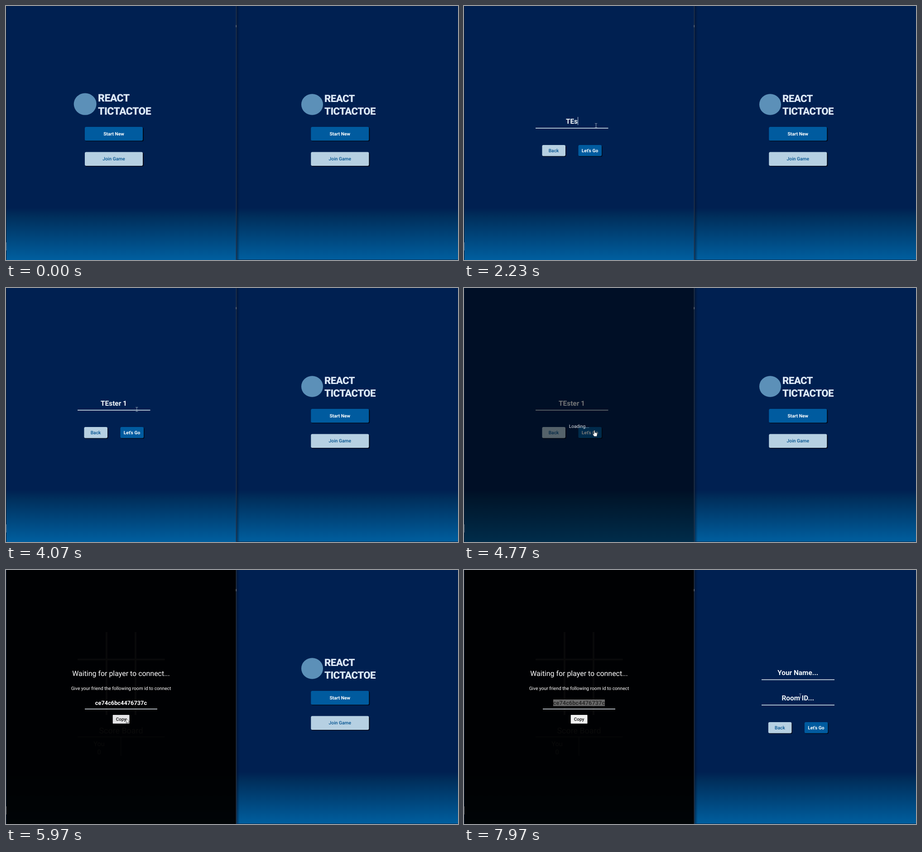
An HTML page that plays this animation: 998 px wide and 561 px high, repeating every 8 s.

```html
<!DOCTYPE html>
<html lang="en">
<head>
<meta charset="utf-8">
<title>Tic-tac-toe rooms</title>
<style>
  html, body { margin: 0; width: 100%; height: 100%; overflow: hidden; background: #00204f; }
  svg { display: block; width: 100%; height: 100%; }
  text { font-family: Roboto, "Open Sans", sans-serif; font-size: 10.26px; fill: #fff; text-anchor: middle; text-rendering: geometricPrecision; }
  .brand { font-weight: 900; text-anchor: start; fill: #dce8f6; letter-spacing: -.6px; }
  .bold { font-weight: 700; }
  .field { font-weight: 700; font-size: 15.4px; fill: #f2f6fa; }
  .room { font-weight: 700; font-size: 12.8px; }
  .dark { fill: #00518f; font-weight: 500; }
  .primary { fill: #005b9f; }
  .light { fill: #b6d0e2; }
  .shadow { fill: #000612; opacity: .85; }
  .rule { fill: #e6eef5; }
  .disc { fill: #5c90b8; }
</style>
</head>
<body>
<svg viewBox="0 0 998 561" preserveAspectRatio="none">
  <defs>
    <linearGradient id="sky" x1="0" y1="0" x2="0" y2="1">
      <stop offset="0" stop-color="#002051"/>
      <stop offset=".795" stop-color="#002051"/>
      <stop offset=".83" stop-color="#002f5c"/>
      <stop offset="1" stop-color="#005f9f"/>
    </linearGradient>
    <linearGradient id="edge">
      <stop offset="0" stop-color="#000c20" stop-opacity=".5"/>
      <stop offset="1" stop-color="#000c20" stop-opacity="0"/>
    </linearGradient>
    <g id="menuButtons">
      <rect class="shadow" x="175" y="268.5" width="129" height="30.5" rx="3"/>
      <rect class="primary" x="174" y="267" width="128" height="30.5" rx="3"/>
      <text class="bold" x="238" y="286">Start New</text>
      <rect class="shadow" x="175" y="324" width="129" height="30.5" rx="3"/>
      <rect class="light" x="174" y="322.5" width="128" height="30.5" rx="3"/>
      <text class="dark" x="238" y="341.2">Join Game</text>
    </g>
    <g id="formButtons">
      <rect class="shadow" x="173.5" y="308.5" width="52" height="24.5" rx="3"/>
      <rect class="light" x="172.5" y="307" width="51.5" height="24.5" rx="3"/>
      <text class="dark" x="198" y="323">Back</text>
      <rect class="shadow" x="253.5" y="308.5" width="52" height="24.5" rx="3"/>
      <rect class="primary" x="252.5" y="307" width="51.5" height="24.5" rx="3"/>
      <text class="bold" x="278" y="323">Let's Go</text>
    </g>
  </defs>

  <rect width="998" height="561" fill="url(#sky)"/>

  <!-- left window -->
  <g data-show="0-640">
    <ellipse class="disc" cx="174.7" cy="216.6" rx="25" ry="24.2"/>
    <text class="brand" x="203" y="210.5" style="font-size:23px">REACT</text>
    <text class="brand" x="203" y="239.5" style="font-size:23px">TICTACTOE</text>
    <use href="#menuButtons"/>
  </g>
  <g data-show="640-4960">
    <text id="name" class="field" x="238" y="259.6"></text>
    <rect id="caret" y="245" width="1" height="18" fill="#c4d2e2"/>
    <rect class="rule" x="158" y="269" width="160.5" height="1.5"/>
    <use href="#formButtons"/>
  </g>
  <g data-show="4700-4960">
    <rect width="508" height="561" opacity=".53"/>
    <text x="254" y="308.5" style="fill:#e4e8ec">Loading...</text>
  </g>
  <g data-show="4960-8000">
    <path d="M222 137V320M286 137V320M158 197.7H350.5M158 259H350.5" stroke="#e9eef6" stroke-width="3.8" fill="none"/>
    <text x="254" y="361" style="font-size:17.9px">Score Board</text>
    <path d="M158 368.7H350.5M253.8 369V410.5" stroke="#dfe7ef" fill="none"/>
    <text x="205.5" y="389" style="font-size:14.6px">You</text>
    <text x="205.5" y="407" style="font-size:14.6px">0</text>
  </g>
  <g data-show="4960-5430">
    <path d="M0 548H168V561H0Z" fill="#020912"/>
    <text x="4" y="557.3" style="font:7.35px 'Open Sans',sans-serif;text-anchor:start">Waiting for react-ttt-app.herokuapp.com...</text>
  </g>
  <g data-show="5430-8000">
    <rect width="508" height="561" opacity=".96"/>
    <text x="254" y="234" style="font-size:15.95px">Waiting for player to connect...</text>
    <text x="254" y="265">Give your friend the following room id to connect</text>
    <rect id="mark" data-show="6400-8000" x="197" y="286" width="114" height="14.5"/>
    <text id="room" class="room" x="254" y="297.7">ce74c6bc4476737c</text>
    <rect class="rule" x="174" y="306.3" width="160" height="1.5"/>
    <rect id="copy" x="235.7" y="320" width="36.8" height="19.3" rx="1"/>
    <text x="254" y="333.2" style="fill:#111;font-weight:500;font-size:10px">Copy</text>
  </g>

  <!-- right window -->
  <g data-show="0-7570">
    <ellipse class="disc" cx="676" cy="217.5" rx="24" ry="23.2"/>
    <text class="brand" x="703" y="211.5" style="font-size:22.2px">REACT</text>
    <text class="brand" x="703" y="239.5" style="font-size:22.2px">TICTACTOE</text>
    <use href="#menuButtons" x="499.3"/>
  </g>
  <g data-show="7570-8000">
    <text class="field" x="737.2" y="232.3">Your Name...</text>
    <rect class="rule" x="657" y="241.6" width="161" height="1.5"/>
    <text class="field" x="737.2" y="288.4">Room ID...</text>
    <rect class="rule" x="657" y="297.6" width="161" height="1.5"/>
    <use href="#formButtons" x="499.4" y="29"/>
  </g>

  <!-- window edges -->
  <rect x="509" width="7" height="561" fill="url(#edge)"/>
  <rect x="507.6" width="1.6" height="561" fill="#26354a"/>
  <rect x="507.5" y="42" width="1.5" height="5" fill="#69727e"/>
  <rect width="1" height="561" fill="#0a1a33"/>
  <rect y="522" width="1" height="18" fill="#69727e"/>
  <rect x="510" y="560" width="488" height="1" fill="#0a2c50"/>

  <g id="cursor">
    <path id="arrow" d="M0 0V10.6L2.5 8.4L4.1 12L5.9 11.2L4.3 7.8H7.6Z" fill="#fff" stroke="#111" stroke-width=".7"/>
    <path id="hand" d="M-1 1Q0 -.6 1 1V5.2L5 6Q6.3 6.4 6.2 8L5.4 13.8H-.6L-3.6 9.4Q-3.9 7.6 -2.4 8L-1 9.2Z" fill="#fff" stroke="#111" stroke-width=".6"/>
    <path id="beam" d="M-2.5 -4.6H-.6L0 -4L.6 -4.6H2.5M0 -4V4M-2.5 4.6H-.6L0 4L.6 4.6H2.5" fill="none" stroke="#aab4c2" stroke-width=".9"/>
  </g>
</svg>
<script>
const LOOP = 8000;
const $ = id => document.getElementById(id);
const timed = [...document.querySelectorAll('[data-show]')].map(el => {
  const [from, to] = el.dataset.show.split('-').map(Number);
  return { el, from, to };
});

const NAME = 'TEster 1';
const keys = [1970, 2090, 2190, 2270, 2340, 2410, 2480, 2540];
const FOCUS = 1070, BLINK = 500;

// time, x, y of the pointer's hot spot
const path = [
  [60, 400, 430], [430, 268, 288], [870, 268, 288], [1070, 285, 258],
  [1400, 291.5, 264], [3830, 291.5, 264], [4070, 288.8, 268], [4500, 288, 314],
  [4820, 288, 314], [5080, 318.5, 256], [5420, 318.5, 256], [5800, 265.5, 328],
  [6600, 265.5, 328], [7180, 822, 340], [7430, 745, 333], [7600, 745, 333], [7850, 742.5, 278]
];
// pointer shape from each time on
const shapes = [
  [60, 'arrow'], [390, 'hand'], [640, 'arrow'], [1000, 'beam'], [4180, 'arrow'],
  [4400, 'hand'], [4960, 'arrow'], [7350, 'hand'], [7570, 'arrow'], [7740, 'beam']
];

const show = (el, on) => { el.style.display = on ? '' : 'none'; };

function pointerAt(t) {
  const i = path.findIndex(p => p[0] > t);
  if (i === 0) return path[0].slice(1);
  if (i < 0) return path[path.length - 1].slice(1);
  const [t0, x0, y0] = path[i - 1], [t1, x1, y1] = path[i];
  const u = (t - t0) / (t1 - t0), e = u * u * (3 - 2 * u);
  return [x0 + (x1 - x0) * e, y0 + (y1 - y0) * e];
}

function drawField(t) {
  const typed = keys.filter(k => k <= t).length;
  const name = $('name');
  const text = typed ? NAME.slice(0, typed) : 'Your Name...';
  if (name.textContent !== text) name.textContent = text;
  const since = t - (typed ? keys[typed - 1] : FOCUS);
  const on = t >= FOCUS && t < 4600 && since % (2 * BLINK) < BLINK;
  show($('caret'), on);
  if (on) $('caret').setAttribute('x', 238 + (typed ? name.getComputedTextLength() / 2 : 0));
}

function draw(t) {
  for (const { el, from, to } of timed) show(el, t >= from && t < to);
  if (t >= 640 && t < 4960) drawField(t);

  const picked = t >= 6400, away = t >= 7500;
  $('mark').style.fill = away ? '#696969' : '#3390ff';
  $('room').style.fill = away ? '#2b2b2b' : '#fff';
  $('copy').style.fill = t > 5700 && t < 6700 ? '#e4e4e6' : '#f1f1f1';
  if (picked && t < 6470) $('copy').style.fill = '#f5f5f5';

  const [x, y] = pointerAt(t);
  const shape = shapes.filter(s => s[0] <= t).pop();
  $('cursor').setAttribute('transform', `translate(${x} ${y})`);
  for (const id of ['arrow', 'hand', 'beam']) show($(id), shape && shape[1] === id);
}

const start = performance.now();
function tick() {
  draw((performance.now() - start) % LOOP);
  requestAnimationFrame(tick);
}
draw(0);
requestAnimationFrame(tick);
</script>
</body>
</html>
```
